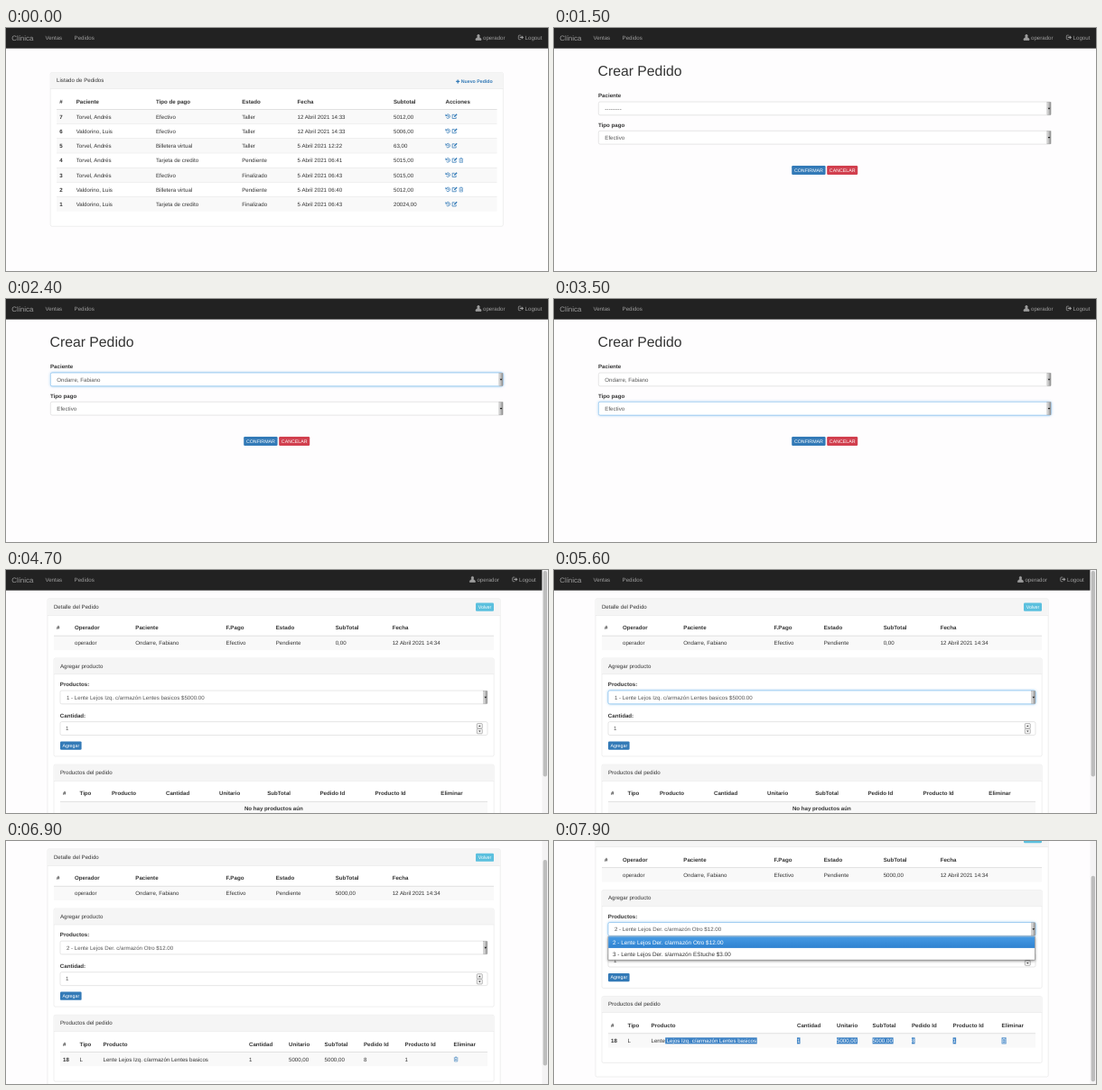
An HTML page that plays this animation: 600x270 px, repeating every 8 s.

```html
<!DOCTYPE html>
<html lang="es">
<head>
<meta charset="utf-8">
<title>Pedidos</title>
<style>
html, body { margin: 0; height: 100%; overflow: hidden; background: #fefdfe; }
svg { display: block; width: 100vw; height: 100vh; font-family: "Liberation Sans", Arial, sans-serif; text-rendering: geometricPrecision; }
.focus { filter: drop-shadow(0 0 1.6px rgba(102, 175, 233, .7)); }
.list { filter: drop-shadow(0 1px 1.5px rgba(0, 0, 0, .45)); }
</style>
</head>
<body>
<svg id="stage" viewBox="0 0 600 270"></svg>
<script>
const LOOP = 8000, BODY = 6.15, SMALL = 5.27, MAX_SCROLL = 43.5;
const BLUE = '#337ab7', INK = '#333';
const stage = document.getElementById('stage');

const USER = 'operador';
const [ANDRES, LUIS, FABIANO] = ['Torvel, Andrés', 'Valdorino, Luis', 'Ondarre, Fabiano'];
const PATIENTS = ['---------', ANDRES, LUIS, FABIANO, 'Querales, Ana', 'Sumbaro, Elena'];
const PAYMENTS = ['Efectivo', 'Tarjeta de credito', 'Billetera virtual', 'Tarjeta de debito'];
const LENS = 'Lente Lejos Izq. c/armazón Lentes basicos';
const PRODUCTS = [`1 - ${LENS} $5000.00`, '2 - Lente Lejos Der. c/armazón Otro $12.00', '3 - Lente Lejos Der. s/armazón EStuche $3.00'];
const [CASH, CARD, WALLET] = PAYMENTS;
const ORDERS = [
  [7, ANDRES, CASH, 'Taller', '12 Abril 2021 14:33', '5012,00'],
  [6, LUIS, CASH, 'Taller', '12 Abril 2021 14:33', '5006,00'],
  [5, ANDRES, WALLET, 'Taller', '5 Abril 2021 12:22', '63,00'],
  [4, ANDRES, CARD, 'Pendiente', '5 Abril 2021 06:41', '5015,00'],
  [3, ANDRES, CASH, 'Finalizado', '5 Abril 2021 06:43', '5015,00'],
  [2, LUIS, WALLET, 'Pendiente', '5 Abril 2021 06:40', '5012,00'],
  [1, LUIS, CARD, 'Finalizado', '5 Abril 2021 06:43', '20024,00']
];

// y is the middle of the capitals
const text = (x, y, s, { size = BODY, fill = INK, bold, mid, extra = '' } = {}) =>
  `<text x="${x}" y="${y + size * .36}" font-size="${size}" fill="${fill}"${bold ? ' font-weight="700"' : ''}${mid ? ' text-anchor="middle"' : ''} ${extra}>${s}</text>`;
const bold = (x, y, s) => text(x, y, s, { bold: true });
const rect = (x, y, x2, y2, fill, extra = '') =>
  `<rect x="${x}" y="${y}" width="${x2 - x}" height="${y2 - y}" fill="${fill}" ${extra}/>`;
const box = (x, y, x2, y2, stroke, cls = '') =>
  rect(x, y, x2, y2, '#fff', `rx="1.7" stroke="${stroke}" stroke-width=".5" class="${cls}"`);
const button = (x, y, x2, y2, fill, s) =>
  rect(x, y, x2, y2, fill, 'rx="1.2"') + text((x + x2) / 2, (y + y2) / 2 - .2, s, { size: SMALL, fill: '#fff', mid: true });

const ICONS = {
  user: '<path d="M-3 3v-1q0-1 2-1.600v-1q-.8-2.500 1-2.500t1 2.500v1q2 .6 2 1.600v1z" fill="currentColor"/>',
  exit: '<path d="M0-2.300h-1.600q-.9 0-.9.900v2.800q0 .9.900.900h1.600"/><path d="M-1-.6h2v-1.600l2.300 2.200-2.300 2.200v-1.600h-2z" fill="currentColor" stroke="none"/>',
  history: '<path d="M-1.700-1.500a2.200 2.200 0 1 1-.2 2.600M0-1.200v1.400h1.200"/><path d="M-2.800-2.600v2.300h2.300z" fill="currentColor" stroke="none"/>',
  edit: '<path d="M1.600.6v1.700h-4.100v-4.200h2.600"/><path d="M-.8.8l.3-1.300 2.500-2.400 1 1-2.500 2.400z" fill="currentColor" stroke="none"/>',
  trash: '<path d="M-1.700-1.300v3.800h3.400v-3.800M-2.300-1.600h4.600M-.7-1.700v-.8h1.400v.8M-.6-.4v2M.6-.4v2" stroke-width=".55"/>',
  plus: '<path d="M-2 0h4M0-2v4" stroke-width="1.300"/>'
};
const icon = (name, x, y, color = BLUE) =>
  `<g transform="translate(${x} ${y})" color="${color}" stroke="currentColor" stroke-width=".75" fill="none">${ICONS[name]}</g>`;

const panel = (x, y, x2, y2, head, title) =>
  box(x, y, x2, y2, '#ddd') + rect(x + .3, y + .3, x2 - .3, y + head, '#f5f5f5', 'rx="1.4"') +
  rect(x, y + head, x2, y + head + .45, '#ddd') + text(x + 6.9, y + 8.5, title);

function table(x, x2, y, cols, heads, rows) {
  let out = heads.map((h, i) => bold(cols[i], y, h)).join('');
  rows.forEach((row, r) => {
    const top = y + 8.7 + r * 16.25;
    if (r % 2 == 0) out += rect(x, top, x2, top + 16.25, '#f9f9f9');
    out += rect(x, top, x2, top + (r ? .45 : .85), '#ddd');
    out += row.map((s, i) => text(cols[i], top + 8.35, s, { bold: !i })).join('');
  });
  return out;
}

function select(x, y, x2, value, focus) {
  const a = x2 - 2.2, m = y + 7.4;
  return box(x, y, x2, y + 14.8, focus ? '#66afe9' : '#ccc', focus ? 'focus' : '') +
    text(x + 7, m, value, { fill: '#555' }) +
    rect(x2 - 4.3, y + .3, x2 - .2, y + 14.5, 'url(#bar)', 'stroke="#999" stroke-width=".4"') +
    `<path d="M${a - 1.3} ${m - .7}h2.600l-1.300 1.800z" fill="#111"/>`;
}

function options(x, y, x2, list, hot) {
  const bottom = y + list.length * 13;
  return rect(x, y, x2, bottom, '#fff', 'class="list" stroke="#777" stroke-width=".5"') +
    list.map((s, i) => {
      const top = y + i * 13;
      return (i == hot ? rect(x + .2, top + .2, x2 - .2, top + 12.8, 'url(#hot)') : '') +
        text(x + 5, top + 6.6, s, { size: 6.38, fill: i == hot ? '#fff' : INK });
    }).join('');
}

function navbar(shift) {
  const gray = { fill: '#9d9d9d' };
  return rect(0, 0, 600, 22.4, '#222') + rect(0, 22, 600, 22.4, '#080808') +
    text(6.2, 10.7, 'Clínica', { size: 7.9, ...gray }) +
    text(43.4, 10.7, 'Ventas', gray) + text(75.6, 10.7, 'Pedidos', gray) +
    icon('user', 523 - shift, 10.4, '#9d9d9d') + text(528 - shift, 10.7, USER, gray) +
    icon('exit', 569.8 - shift, 10.4, '#9d9d9d') + text(574.6 - shift, 10.7, 'Logout', gray);
}

function listPage(t) {
  const hover = t >= 900, color = hover ? '#23527c' : BLUE;
  let out = navbar(0) + panel(49.2, 49.4, 550.3, 220.3, 18, 'Listado de Pedidos') +
    icon('plus', 500.2, 59.4, color) +
    text(503.7, 59.5, 'Nuevo Pedido', { size: SMALL, fill: color, bold: true, extra: hover ? 'text-decoration="underline"' : '' }) +
    table(56, 543.5, 81.3, [59.2, 77.7, 166, 261.2, 322.6, 429, 486.5],
      ['#', 'Paciente', 'Tipo de pago', 'Estado', 'Fecha', 'Subtotal', 'Acciones'], ORDERS);
  ORDERS.forEach((o, i) => {
    const y = 98.2 + i * 16.25;
    out += icon('history', 489.3, y) + icon('edit', 496.6, y);
    if (o[3] == 'Pendiente') out += icon('trash', 503.8, y);
  });
  return out;
}

function createPage(t) {
  const patientOpen = t >= 1800 && t < 2400, payOpen = t >= 2800 && t < 3500;
  let out = navbar(0) + text(48.6, 47.4, 'Crear Pedido', { size: 15.75 }) +
    bold(49, 75, 'Paciente') + bold(49, 107.4, 'Tipo pago') +
    select(49.3, 82, 550.2, t < 2400 ? PATIENTS[0] : FABIANO, t >= 1800 && t < 2700) +
    select(49.3, 114.3, 550.2, CASH, t >= 2700 && t < 3700) +
    button(263.2, 153, 300.6, 163, t >= 3600 ? '#286090' : BLUE, 'CONFIRMAR') +
    button(302.2, 153, 336.2, 163, '#d13f4e', 'CANCELAR');
  if (patientOpen) out += options(49.5, 97.3, 549.5, PATIENTS, Math.min(3, Math.floor((t - 1800) / 130)));
  if (payOpen) out += options(49.5, 129.6, 549.5, PAYMENTS, 0);
  return out;
}

function itemTable(t, added) {
  const heads = ['#', 'Tipo', 'Producto', 'Cantidad', 'Unitario', 'SubTotal', 'Pedido Id', 'Producto Id', 'Eliminar'];
  if (!added)
    return table(60, 533, 248.2, [63, 81.5, 117, 177, 236, 289.2, 347.5, 408.5, 481.3], heads, [[]]) +
      text(296.3, 265.2, 'No hay productos aún', { bold: true, mid: true });
  const cols = [63, 81.5, 107.5, 269, 313, 352.6, 396, 441.6, 495.6];
  const cells = [18, 'L', LENS, 1, '5000,00', '5000,00', 8, 1];
  const widths = [101.5, 3.5, 23, 23, 3.5, 3.5, 5];
  const picked = t < 7200 ? 0 : Math.min(7, 1 + Math.floor((t - 7200) / 50));
  let out = table(60, 533, 248.2, cols, heads, [cells]);
  for (let i = 0; i < picked; i++) {
    const x = i ? cols[i + 2] : 123.2;
    out += rect(x, 261.9, x + widths[i], 268.9, '#3a80c4');
    if (i < 6) out += text(i ? x : x + 1.5, 265.25, i ? cells[i + 2] : LENS.slice(6), { fill: '#fff' });
  }
  return out + icon('trash', 498.1, 265.3, picked == 7 ? '#fff' : BLUE);
}

function spinner() {
  return [170.6, 176.4].map((y, i) => {
    const d = i ? 1 : -1;
    return rect(521.3, y, 527.3, y + 5.4, '#f4f4f4', 'rx=".8" stroke="#777" stroke-width=".5"') +
      `<path d="M523 ${y + 2.7 - d * .7}h2.600l-1.300 ${d * 1.6}z" fill="#333"/>`;
  }).join('');
}

function detailPage(t) {
  const added = t >= 6100;
  const p = Math.min(1, Math.max(0, (t - 6720) / 350));
  const scroll = MAX_SCROLL * p * p * (3 - 2 * p);
  const focus = t >= 5000 && t < 6100 || t >= 7700;
  let out = navbar(6.6) + panel(46, 31.8, 547.2, 305.5, 18.2, 'Detalle del Pedido') +
    button(520, 36.5, 540, 45.7, '#5bc0de', 'Volver') +
    table(53, 540, 64, [56, 76, 143.3, 243.6, 298.7, 364.7, 427.7],
      ['#', 'Operador', 'Paciente', 'F.Pago', 'Estado', 'SubTotal', 'Fecha'],
      [['', USER, FABIANO, CASH, 'Pendiente', added ? '5000,00' : '0,00', '12 Abril 2021 14:34']]) +
    panel(53, 98, 540.2, 207, 17.6, 'Agregar producto') +
    bold(59.8, 127, 'Productos:') + select(60, 134, 533, PRODUCTS[+added], focus) +
    bold(59.8, 161.6, 'Cantidad:') + box(60, 168.6, 533, 183.5, '#ccc') +
    text(66, 176, '1', { fill: '#555' }) + spinner() +
    button(60, 190.4, 83.6, 199.7, t >= 5900 && !added ? '#286090' : BLUE, 'Agregar') +
    panel(53, 216.2, 540.2, 290, 17.8, 'Productos del pedido') + itemTable(t, added);
  if (t >= 5000 && t < 5600) out += options(60, 149.5, 532.3, PRODUCTS, 0);
  if (t >= 7700) out += options(60, 149.6, 532.3, PRODUCTS.slice(1), 0);
  const top = 1 + scroll * .87;
  return `<g transform="translate(0 ${-scroll})">${out}</g>` + rect(593.4, 0, 600, 270, '#f4f3f4') +
    rect(594.6, top, 599, top + 228.5, '#bdbdbd', 'rx="2"');
}

const gradient = (id, dir, a, b) =>
  `<linearGradient id="${id}" x2="${dir == 'x' ? 1 : 0}" y2="${dir == 'x' ? 0 : 1}"><stop stop-color="${a}"/><stop offset="1" stop-color="${b}"/></linearGradient>`;
const DEFS = `<defs>${gradient('bar', 'x', '#e4e4e4', '#8c8c8c')}${gradient('hot', 'y', '#479be4', '#2f82d0')}</defs>`;

let last = '';
function draw(now) {
  const t = now % LOOP;
  const page = t < 1300 ? listPage : t < 4100 ? createPage : detailPage;
  const html = DEFS + page(t);
  if (html != last) stage.innerHTML = last = html;
  requestAnimationFrame(draw);
}
draw(performance.now());
</script>
</body>
</html>
```
